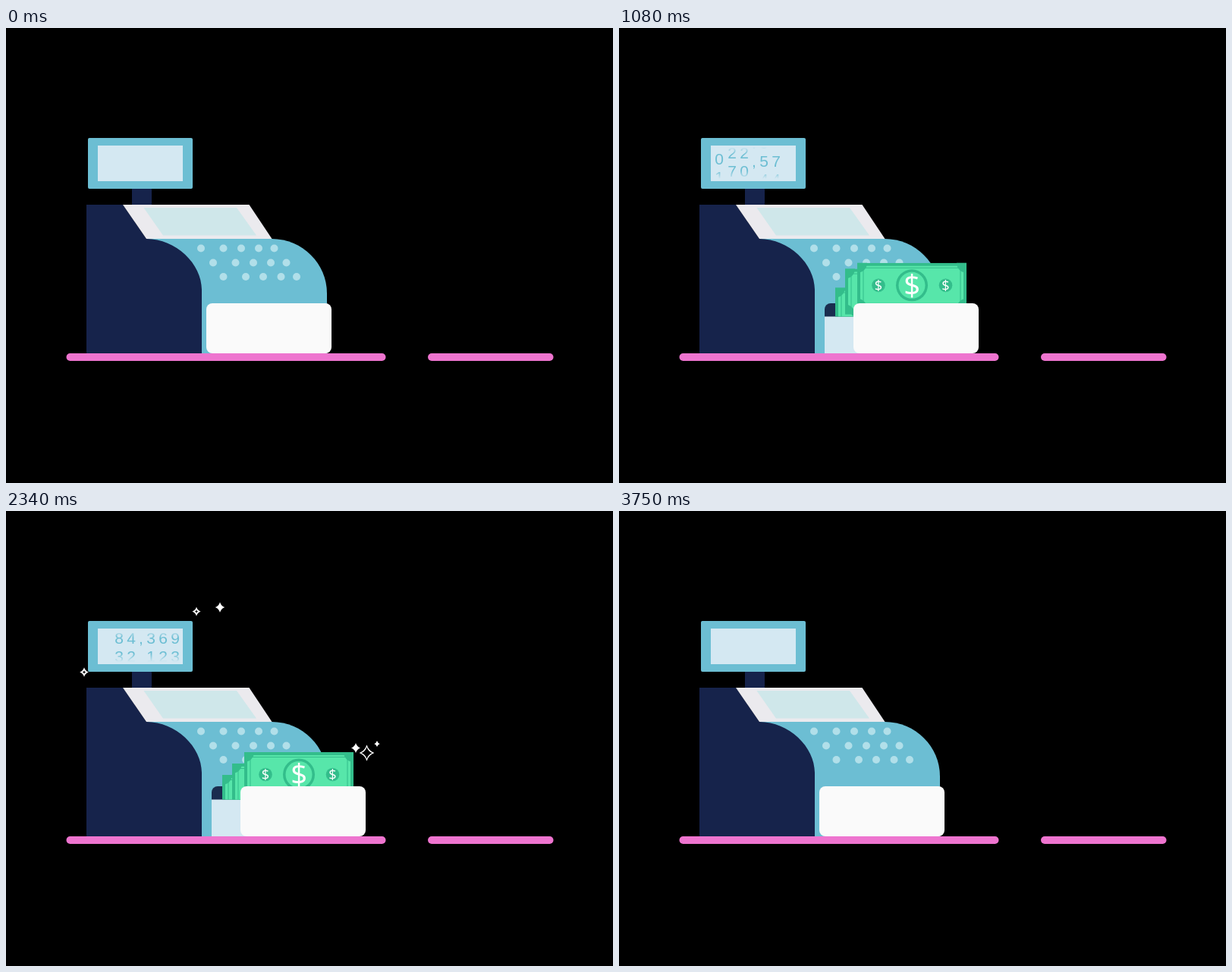
Recreate the animation shown at these times as an HTML page with a canvas. Size 800 px wide and 600 px high, loop 3930 ms.

```html
<!DOCTYPE html>
<html lang="en">
<head>
<meta charset="utf-8">
<title>Cash register</title>
<style>
html, body { margin: 0; width: 100%; height: 100%; overflow: hidden; background: #000; }
canvas { display: block; width: 800px; height: 600px; }
</style>
</head>
<body>
<canvas id="stage" width="800" height="600"></canvas>
<script>
const ctx = document.getElementById('stage').getContext('2d');
const LOOP = 3930;
const TEAL = '#6cbed3', NAVY = '#16234b', SCREEN = '#d4e8f2', PINK = '#ee74cf';
const GREEN = '#57e6aa', DARK_GREEN = '#33bd8b';

const clamp = v => Math.max(0, Math.min(1, v));
const ramp = (t, start, length) => {
  const u = clamp((t - start) / length);
  return u * u * (3 - 2 * u);
};

// Cubic bezier easing (.35, 0, .3, 1)
function slide(t, start, length) {
  const x = clamp((t - start) / length);
  let lo = 0, hi = 1;
  for (let i = 0; i < 24; i++) {
    const s = (lo + hi) / 2, r = 1 - s;
    if (1.05 * r * r * s + 0.9 * r * s * s + s * s * s < x) lo = s;
    else hi = s;
  }
  return lo * lo * (3 - 2 * lo);
}

function rect(color, x, y, w, h, radius = 0) {
  ctx.fillStyle = color;
  ctx.beginPath();
  ctx.roundRect(x, y, w, h, radius);
  ctx.fill();
}

function disc(color, x, y, r) {
  ctx.fillStyle = color;
  ctx.beginPath();
  ctx.arc(x, y, r, 0, Math.PI * 2);
  ctx.fill();
}

function shape(color, path) {
  ctx.fillStyle = color;
  ctx.fill(new Path2D(path));
}

function text(str, x, y, font, color) {
  ctx.font = font;
  ctx.fillStyle = color;
  ctx.textAlign = 'center';
  ctx.fillText(str, x, y);
}

// Display: columns of digits rolling upwards
const LINE = 24;
const REEL_TIMES = [840, 1320, 1800, 2340];
const REELS = {
  first: { moves: [0, 39, 82, 130], tail: 0.09 },
  left: { moves: [0, 38.5, 74, 112], tail: 0.1 },
  right: { moves: [0, 49, 95, 152], tail: 0.07 }
};
// x, reel, centre of the top digit at 840 ms, digits
const COLUMNS = [
  [132, 'first', 168, '80157'],
  [149, 'left', 160, '0276483'],
  [165, 'left', 184, '202142'],
  [178, 'right', 176, '.,,,,,,'],
  [191, 'right', 176, '05485931'],
  [207, 'right', 200, '7462862'],
  [223, 'right', 272, '3093']
];

function rolled({ moves, tail }, t) {
  if (t < REEL_TIMES[0]) return (t - REEL_TIMES[0]) * 0.1;
  for (let i = 1; i < moves.length; i++) {
    if (t < REEL_TIMES[i]) {
      const u = (t - REEL_TIMES[i - 1]) / (REEL_TIMES[i] - REEL_TIMES[i - 1]);
      return moves[i - 1] + u * (moves[i] - moves[i - 1]);
    }
  }
  return moves[3] + (t - REEL_TIMES[3]) * tail;
}

function fade(from, to) {
  const g = ctx.createLinearGradient(0, from, 0, to);
  g.addColorStop(0, SCREEN);
  g.addColorStop(1, 'rgba(212,232,242,0)');
  ctx.fillStyle = g;
  ctx.fillRect(121, Math.min(from, to), 112, Math.abs(to - from));
}

function display(t) {
  rect(NAVY, 166, 210, 26, 24);
  rect(TEAL, 108, 145, 138, 67, 2);
  rect(SCREEN, 121, 155, 112, 47);
  ctx.save();
  ctx.beginPath();
  ctx.rect(121, 157, 112, 42);
  ctx.clip();
  for (const [x, reel, top, digits] of COLUMNS) {
    const shift = rolled(REELS[reel], t);
    [...digits].forEach((d, i) => {
      const y = top + i * LINE - shift;
      if (y > 145 && y < 212) text(d, x, y + 7.3, '21px "Liberation Sans", Arial, sans-serif', TEAL);
    });
  }
  fade(157, 167);
  fade(199, 188);
  ctx.restore();
}

const KEY_ROWS = [
  [290.5, 257, 286.5, 310, 333, 353.5],
  [309.5, 273, 302.5, 326, 349, 369.5],
  [328, 286.5, 316, 339, 362.5, 383]
];

function register() {
  shape(TEAL, 'M185 278H350C391 278 423 311 423 350V429H185Z');
  shape(NAVY, 'M106 233H154L185 278C224 278 258 311 258 345V429H106Z');
  shape('#ebeaee', 'M154 233H320.5L350.5 278H185Z');
  shape('#cfe7ea', 'M181.5 237H304L330 273.5H207Z');
  for (const [y, ...xs] of KEY_ROWS) xs.forEach(x => disc('#b1dfe9', x, y, 5));
}

// Bills, front to back
const BILLS = [[314, 318], [298, 333], [285, 348]];

function billOffset(t, i) {
  const rise = 608 + i * 110, drop = 2825 + i * 135;
  return 60 - 76 * ramp(t, rise, 330) + 16 * ramp(t, rise + 330, 290)
    - 16 * ramp(t, drop - 290, 290) + 76 * ramp(t, drop, 330);
}

function bill(x, y) {
  ctx.save();
  ctx.translate(x, y);
  ctx.beginPath();
  ctx.rect(0, 0, 144, 60);
  ctx.clip();
  rect(DARK_GREEN, 0, 0, 144, 60);
  rect(GREEN, 4, 4, 136, 52);
  ctx.strokeStyle = DARK_GREEN;
  ctx.lineWidth = 1;
  ctx.strokeRect(8, 6.5, 128, 47);
  for (const cx of [0, 144]) for (const cy of [0, 60]) disc(DARK_GREEN, cx, cy, 13);
  disc(DARK_GREEN, 72, 29.5, 21);
  disc(GREEN, 72, 29.5, 17.5);
  text('$', 72, 43, '38px "Noto Sans", sans-serif', '#fff');
  for (const cx of [28, 116.5]) {
    disc(DARK_GREEN, cx, 29.5, 8.8);
    text('$', cx, 36, '18px "Noto Sans", sans-serif', '#fff');
  }
  ctx.restore();
}

function drawer(t) {
  const x = 264 + 45 * (slide(t, 240, 690) - slide(t, 3030, 660));
  if (x > 264.1) {
    const w = Math.max(0, x + 10 - 271);
    rect('#1a2d4f', 271, 363, w, 20, [8, 0, 0, 0]);
    rect(SCREEN, 271, 380.5, w, 48.5);
  }
  ctx.save();
  ctx.beginPath();
  ctx.rect(0, 0, 800, 380.5);
  ctx.clip();
  for (let i = 2; i >= 0; i--) {
    const offset = billOffset(t, i);
    if (offset < 59.9) bill(BILLS[i][0], BILLS[i][1] + offset);
  }
  ctx.restore();
  rect('#fafafa', x, 363, 165, 66, 8);
}

// x, y, radius, start
const SPARKLES = [
  [88, 226, 12.5, 1530], [72.5, 218, 6.3, 1685], [266.5, 140, 6, 1660],
  [251, 132.5, 6, 1930], [103, 212.5, 6.3, 1930], [282, 127, 6.8, 2070],
  [475.5, 319, 10.7, 1850], [461, 312.5, 6.5, 2070], [489, 307, 6.5, 2195]
];

function star(x, y, r) {
  const w = r * 0.92, c = r * 0.24;
  ctx.moveTo(x, y - r);
  ctx.quadraticCurveTo(x + c, y - c, x + w, y);
  ctx.quadraticCurveTo(x + c, y + c, x, y + r);
  ctx.quadraticCurveTo(x - c, y + c, x - w, y);
  ctx.quadraticCurveTo(x - c, y - c, x, y - r);
  ctx.closePath();
}

function sparkles(t) {
  ctx.fillStyle = '#fff';
  for (const [x, y, r, start] of SPARKLES) {
    const age = t - start;
    if (age <= 0 || age >= 600) continue;
    ctx.beginPath();
    star(x, y, r * ramp(age, 0, 250));
    star(x, y, r * ramp(age, 280, 320));
    ctx.fill('evenodd');
  }
}

function draw(now) {
  const t = now % LOOP;
  rect('#000', 0, 0, 800, 600);
  display(t);
  register();
  drawer(t);
  rect(PINK, 79.5, 429, 421, 10, 5);
  rect(PINK, 556, 429, 165.5, 10, 5);
  sparkles(t);
}

function tick() {
  draw(performance.now());
  requestAnimationFrame(tick);
}
tick();
</script>
</body>
</html>
```
